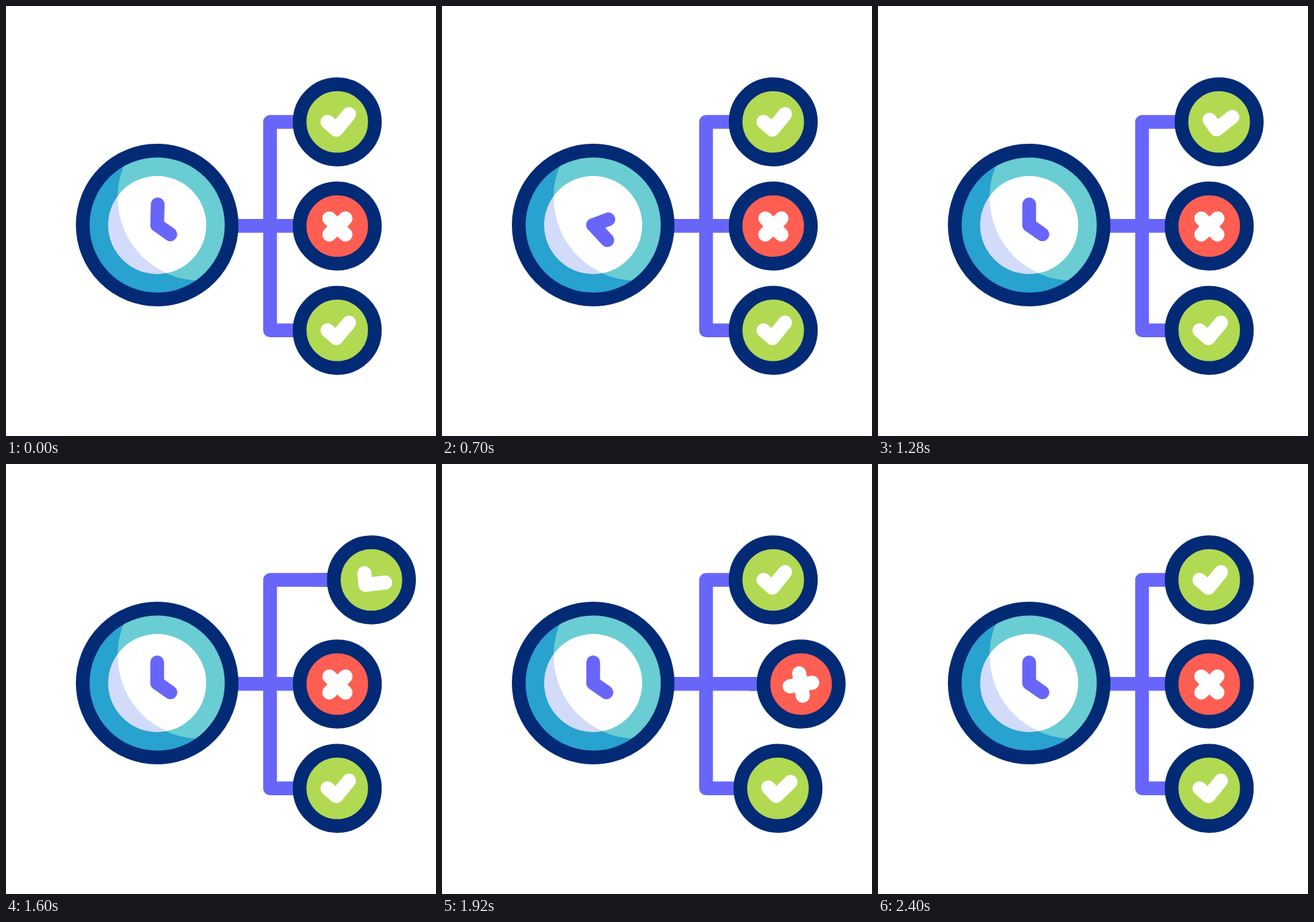
An HTML page for the animation above (2420 ms loop, 640 by 640 pixels).

```html
<!DOCTYPE html>
<html lang="en">
<head>
<meta charset="utf-8">
<title>Schedule</title>
<style>
  html, body { margin: 0; height: 100%; overflow: hidden; background: #fff; }
  svg { display: block; width: 100%; height: 100%; }
  .line { fill: none; stroke: #6866f9; stroke-width: 20.5; stroke-linecap: round; stroke-linejoin: round; }
  .ring { stroke: #032a75; stroke-width: 20.4; }
  .mark { fill: none; stroke: #fff; stroke-width: 21; stroke-linecap: round; stroke-linejoin: round; }
</style>
</head>
<body>
<svg viewBox="0 0 640 640">
  <defs>
    <clipPath id="lit"><circle cx="290" cy="285" r="124"/></clipPath>
  </defs>

  <path class="line" d="M340 327.3H480M490 172.5H393V482.7H490"/>
  <path class="line" id="rails"/>

  <circle cx="225" cy="326" r="105" fill="#28a2ce"/>
  <circle cx="225" cy="326" r="73" fill="#d3dbfb"/>
  <g clip-path="url(#lit)">
    <circle cx="225" cy="326" r="105" fill="#69cdd3"/>
    <circle cx="225" cy="326" r="73" fill="#fff"/>
  </g>
  <circle class="ring" cx="225" cy="326" r="110.8" fill="none"/>
  <g transform="translate(225 326)">
    <path class="line" id="minute" d="M0 0V-30.8"/>
    <path class="line" id="hour" d="M0 0L19.7 13.8"/>
  </g>

  <g id="nodes"></g>
</svg>
<script>
const LOOP = 2420, SPIN = 1000, TRAVEL = 52, TURN = 45;
const CHECK = 'M-14.5 0L-1.3 11.5L17.5 -11.5';
const CROSS = 'M-11.8 -11.3L12.2 12.7M12.2 -11.3L-11.8 12.7';

// Each node rolls out from start to peak and back by end.
const nodes = [
  { y: 172.5, fill: '#b2d952', mark: CHECK, start: 1122, peak: 1575, end: 1870 },
  { y: 327.5, fill: '#ff5f52', mark: CROSS, start: 1595, peak: 1835, end: 2133 },
  { y: 482.8, fill: '#b2d952', mark: CHECK, start: 1866, peak: 2104, end: 2400 }
];

const byId = id => document.getElementById(id);
const clamp = v => Math.min(1, Math.max(0, v));
const smooth = v => (v = clamp(v)) * v * (3 - 2 * v);

byId('nodes').innerHTML = nodes.map(n => `<g>
  <circle class="ring" r="56" fill="${n.fill}"/>
  <path class="mark" d="${n.mark}"/></g>`).join('');
nodes.forEach((n, i) => {
  n.group = byId('nodes').children[i];
  n.icon = n.group.querySelector('.mark');
});

// Cubic Bezier easing (1/6, 1/6, 2/3, 1), solved by bisection.
function spinEase(x) {
  if (x >= 1) return 1;
  const curve = (s, a, b) => 3 * (1 - s) ** 2 * s * a + 3 * (1 - s) * s * s * b + s ** 3;
  let lo = 0, hi = 1;
  for (let i = 0; i < 24; i++) {
    const mid = (lo + hi) / 2;
    if (curve(mid, 1 / 6, 2 / 3) < x) lo = mid; else hi = mid;
  }
  return curve(lo, 1 / 6, 1);
}

function draw(t) {
  const turn = 360 * spinEase(t / SPIN);
  byId('hour').setAttribute('transform', `rotate(${turn})`);
  byId('minute').setAttribute('transform', `rotate(${turn * 4})`);

  let rails = '';
  for (const n of nodes) {
    const out = t < n.peak
      ? smooth((t - n.start) / (n.peak - n.start))
      : 1 - smooth((t - n.peak) / (n.end - n.peak));
    const x = 493 + TRAVEL * out;
    n.group.setAttribute('transform', `translate(${x} ${n.y})`);
    n.icon.setAttribute('transform', `rotate(${TURN * out})`);
    rails += `M460 ${n.y}H${x}`;
  }
  byId('rails').setAttribute('d', rails);
}

const began = performance.now();
function tick() {
  draw((performance.now() - began) % LOOP);
  requestAnimationFrame(tick);
}
tick();
</script>
</body>
</html>
```
